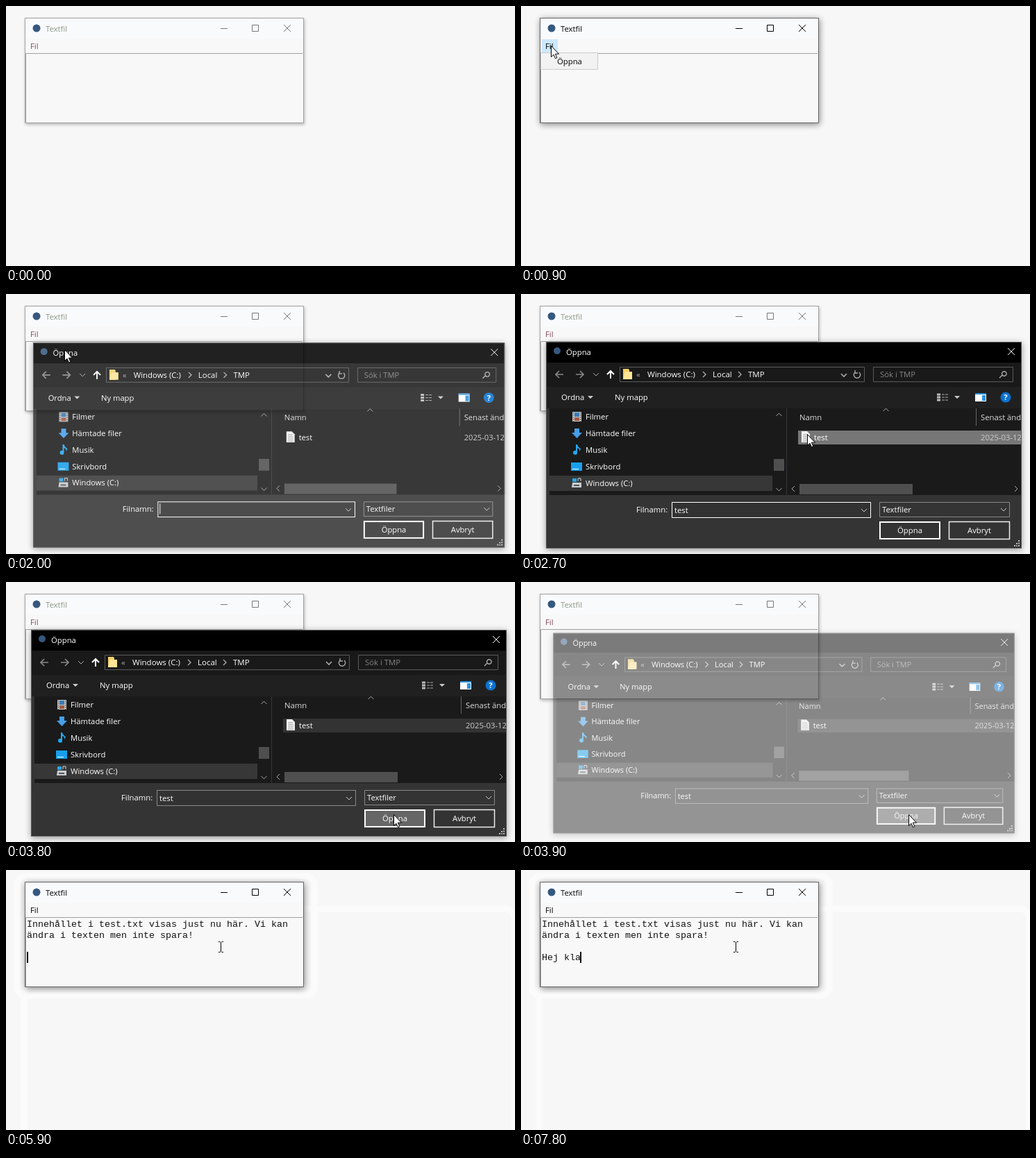
Write an HTML page that moves like this. It is 733 px wide and 375 px high and loops after 8 s.

```html
<!DOCTYPE html>
<html lang="sv">
<head>
<meta charset="utf-8">
<title>Textfil</title>
<style>
  html, body { margin: 0; width: 100%; height: 100%; overflow: hidden; background: #f7f7f7; }
  svg { display: block; font: 11.3px "Open Sans", "Noto Sans", sans-serif; }
  text { white-space: pre; }
  .line { fill: none; stroke: currentColor; }
  #window { --ink: #777; --title: #8a9a84; --menu: #7c4a60; --edge: #a2a2a2; color: var(--ink);
            filter: drop-shadow(1px 2px 2px #0004); }
  #window.active { --ink: #000; --title: #000; --menu: #000; --edge: #666; filter: drop-shadow(1px 2px 5px #0007); }
  #editor { font: 13.333px "Liberation Mono", monospace; fill: #111; }
  #dialog { fill: #fff; color: #aaa; transform-origin: 378.5px 218px; filter: drop-shadow(0 2px 5px #0006); }
  .path { font-size: 11.5px; font-weight: 500; }
  .dim { fill: #858585; }
  .halo { fill: none; stroke: #fbfbfb; stroke-width: 9; }
</style>
</head>
<body>
<svg width="733" height="375" viewBox="0 0 733 375">
  <defs>
    <clipPath id="frame"><rect x="36" y="69" width="685" height="298"/></clipPath>
    <path id="down" class="line" d="M-4 -2 0 2 4 -2"/>
    <path id="drop" d="M-4 -2H4L0 2Z"/>
  </defs>

  <g id="halos">
    <rect class="halo" x="26" y="56" width="706" height="330" rx="14"/>
    <rect class="halo" x="16" y="9" width="428" height="172" rx="12"/>
  </g>

  <g id="window">
    <rect x="27.5" y="17.5" width="401" height="151" fill="#f8f8f8" stroke="var(--edge)"/>
    <path d="M28 18H428V47H28Z" fill="#f9fafc"/>
    <circle cx="44" cy="32" r="5.5" fill="#35587f"/>
    <text x="57" y="37" fill="var(--title)">Textfil</text>
    <path class="line" d="M309 32.5h10M354.5 27.5h9v9h-9ZM400 27l10 10M410 27l-10 10"/>
    <rect id="menuHot" x="30" y="48" width="23" height="19" fill="#cce8ff"/>
    <text x="35" y="62" fill="var(--menu)">Fil</text>
    <path d="M28.5 168V68.5H427" fill="none" stroke="#a0a0a0"/>
  </g>

  <g id="editor">
    <g id="content">
      <text x="30" y="82">Innehållet i test.txt visas just nu här. Vi kan</text>
      <text x="30" y="98">ändra i texten men inte spara!</text>
    </g>
    <text id="typed" x="30" y="130"></text>
    <rect id="caret" y="118" width="2" height="16"/>
  </g>

  <rect id="popup" x="28.5" y="67.5" width="82" height="24" fill="#f2f2f2" stroke="#ccc"/>
  <g id="item">
    <rect id="itemHot" x="31" y="70" width="77" height="19" fill="#90c8f6"/>
    <text id="itemText" x="52" y="84">Öppna</text>
  </g>

  <g id="dialog">
    <g clip-path="url(#frame)">
      <path d="M36 69H722V368H36Z" fill="#343434"/>
      <path d="M36 69H722V99H36Z" fill="#000"/>
      <path d="M36 99H722V134H36Z" fill="#191919"/>
      <path d="M36 134H722V165H36Z" fill="#202020"/>
      <path d="M41 165H722V290H41Z" fill="#1a1a1a"/>
      <path d="M382.5 165V290" stroke="#34343c"/>

      <circle cx="52" cy="82" r="5" fill="#35587f"/>
      <text x="65" y="88">Öppna</text>
      <path class="line" d="M701 78l10 10M711 78l-10 10" color="#fff"/>

      <g class="line" stroke-width="1.7">
        <path d="M61 116H50M55 111l-5 5 5 5" color="#888"/>
        <path d="M79 116H90M85 111l5 5-5 5" color="#888"/>
        <path d="M129 122V111M124 116l5-5 5 5" stroke="#fff" stroke-width="2"/>
      </g>
      <use href="#down" x="108" y="116"/>
      <path class="line" d="M142.5 105.5h352v21h-352ZM507.5 105.5h201v21h-201Z" color="#5a5a5a"/>
      <path d="M147 108h8l1 2v13h-9Z" fill="#f5d16b"/><path d="M150 112h10v11H147Z" fill="#ffe596"/>
      <g class="path">
        <text x="166" y="120" fill="#aaa">«</text>
        <text x="182" y="120">Windows (C:)</text>
        <text x="276" y="120">Local</text>
        <text x="327" y="120">TMP</text>
      </g>
      <path class="line" d="M262 112l4 4-4 4M313 112l4 4-4 4" stroke-width="1.4"/>
      <use href="#down" x="465" y="117" stroke-width="1.6"/>
      <path class="line" d="M481 113a4.7 4.7 0 1 0 6 0M481 110v4h4" stroke-width="1.4"/>
      <text class="dim" x="517" y="120">Sök i TMP</text>
      <path class="line" d="M689 121l4-4M692.5 115a3.3 3.3 0 1 1 6.6 0a3.3 3.3 0 1 1-6.6 0" stroke-width="1.4"/>

      <text x="58" y="153">Ordna</text><use href="#drop" x="100" y="149" fill="#ccc"/>
      <text x="135" y="153">Ny mapp</text>
      <path class="line" d="M599 145h5M599 149h5M599 153h5" stroke-width="3" color="#bbb"/>
      <path class="line" d="M606 145h9M606 149h9M606 153h9" stroke-dasharray="4 1"/>
      <use href="#drop" x="628" y="149" fill="#ccc"/>
      <path d="M654 143h16v12h-16Z"/><path d="M654 143h16v2h-16ZM664 146h5v8h-5Z" fill="#2b93e0"/>
      <circle cx="698" cy="149" r="7.5" fill="#0a72d0"/>
      <text x="698" y="153" text-anchor="middle" font-weight="700">?</text>

      <path d="M41 262H362V284H41Z" fill="#373737"/>
      <path d="M74 170h13v14H74Z" fill="#c8c8c8"/><path d="M77 171h7v6h-7Z" fill="#397bb8"/><path d="M77 178h7v5h-7Z" fill="#a35b45"/>
      <path class="line" d="M75.5 171v13M85.5 171v13" stroke-dasharray="1.5 1.5" color="#333"/>
      <path d="M77 194h7v6h4l-7.500 8-7.500-8h4Z" fill="#479ee8"/>
      <path d="M79 217h2q1 4 5 6-1 3-2 4 1-4-3-5v7a3 3 0 1 1-2-3Z" fill="#25a8ef"/>
      <path d="M72 243h16v12H72Z" fill="#18a0ee"/><path d="M74 252h9v1h-9Z"/>
      <path d="M74 272h13v7H73Z" fill="#c9ced1"/><path d="M74 266h6v5h-6Z" fill="#2ba5e5"/><path d="M82 270v-4h4v4" class="line" color="#ddd"/><path d="M76 275h8v2h-8Z" fill="#555"/>
      <text x="93" y="181">Filmer</text>
      <text x="93" y="205">Hämtade filer</text>
      <text x="93" y="229">Musik</text>
      <text x="93" y="253">Skrivbord</text>
      <text x="93" y="277">Windows (C:)</text>

      <path d="M364 238h15v17h-15Z" fill="#4f4f4f"/>
      <path d="M401 274H564v15H401Z" fill="#4f4f4f"/>
      <path class="line" d="M367.500 176l4-4 4 4M394 277l-4 4 4 4M711 277l4 4-4 4M521.500 169l4-4 4 4"/>
      <use href="#down" x="371.5" y="282"/>

      <path d="M655.500 165V190" stroke="#666"/>
      <text x="401" y="182" fill="#ddd">Namn</text>
      <text x="662" y="182" fill="#ddd">Senast ändrat</text>
      <rect id="row" x="399" y="197" width="330" height="20"/>
      <path d="M404 198h8l4 4v12h-12Z" fill="#f2f2f2"/>
      <path class="line" d="M406 203h7M406 206h8M406 209h8M406 212h8" color="#999"/>
      <text x="422" y="211">test</text>
      <text x="662" y="211" fill="#ccc">2025-03-12</text>

      <text x="166" y="315">Filnamn:</text>
      <rect id="field" x="217.5" y="300.5" width="286" height="22" fill="#323232"/>
      <text id="fileName" x="221" y="316">test</text>
      <path id="fieldCaret" d="M220.500 303v15" stroke="#fff"/>
      <use href="#down" x="494" y="312" color="#ccc"/>
      <path class="line" d="M516.500 300.500h187v21h-187Z" color="#888"/>
      <text x="520" y="315">Textfiler</text>
      <use href="#down" x="695" y="311" color="#ccc"/>
      <rect id="open" x="517" y="329" width="86" height="24" stroke="#fff" stroke-width="2"/>
      <rect x="616.500" y="328.500" width="87" height="25" fill="#333" stroke="#eee" stroke-width="1.5"/>
      <g text-anchor="middle">
        <text x="560" y="345">Öppna</text>
        <text x="660" y="345">Avbryt</text>
      </g>
      <path d="M717 355v9M714 359v5M711 362v2" stroke="#bbb" stroke-width="2" stroke-dasharray="2 1.500"/>
      <rect x="36.500" y="69.500" width="684" height="297" fill="none" stroke="#555"/>
    </g>
  </g>

  <path id="arrow" d="M.5 .5V16.500L4 13.200 6.500 18.700 8.800 17.700 6.400 12.200H11.500Z" fill="#fff" stroke="#000"/>
  <path id="beam" class="line" d="M-3 -7.500H-.5M1.500 -7.500H4M-3 7.500H-.5M1.500 7.500H4M.5 -7V7"/>
</svg>
<script>
const LOOP = 8000, STEP = 100;
const $ = id => document.getElementById(id);
const show = (id, on) => $(id).style.display = on ? '' : 'none';
const within = (t, from, to) => t >= from && t < to;

// time, x, y of the pointer
const route = [
  [100, 628, 158], [800, 43, 56], [1000, 43, 58], [1300, 52, 75], [1500, 54, 76], [1800, 54, 76],
  [2000, 84, 80], [2500, 412, 202], [2900, 412, 202], [3400, 558, 335], [3900, 558, 335],
  [4400, 197, 138], [4600, 197, 138], [4700, 210, 143], [4800, 249, 130], [4900, 271, 118],
  [5100, 271, 108], [5300, 290, 103], [5700, 309, 111]
];
// time at which each character is typed
const phrase = 'Hej kla', keyTimes = [6500, 6700, 6800, 7000, 7500, 7700, 7800];

function pointerAt(t) {
  const next = route.findIndex(p => p[0] > t);
  if (next < 0) return route.at(-1).slice(1);
  const [t0, x0, y0] = route[Math.max(0, next - 1)], [t1, x1, y1] = route[next];
  const u = Math.max(0, (t - t0) / (t1 - t0));
  const k = t1 - t0 > 400 ? u * u * (3 - 2 * u) : u;
  return [x0 + (x1 - x0) * k, y0 + (y1 - y0) * k];
}

function drawPointer(t, busy) {
  const [x, y] = pointerAt(t).map(Math.round);
  const overText = !busy && within(x, 29, 427) && within(y, 69, 168);
  show('arrow', t >= 100 && !overText);
  show('beam', t >= 100 && overText);
  for (const id of ['arrow', 'beam']) $(id).setAttribute('transform', `translate(${x} ${y})`);
}

function drawMenu(t) {
  const open = within(t, 900, 1700), hot = t >= 1200;
  show('popup', open);
  show('menuHot', open);
  show('item', within(t, 900, 1900));
  show('itemHot', hot);
  $('item').style.opacity = t < 1700 ? 1 : t < 1800 ? .75 : .48;
  $('itemText').setAttribute('fill', open ? '#000' : '#fff');
}

function drawDialog(t) {
  const opening = Math.min(1, (t - 1800) / 300), closing = Math.max(0, (t - 3800) / 200);
  const shown = Math.max(0, 1 - (1 - opening) ** 1.8 - closing);
  show('dialog', within(t, 1900, 4000));
  $('dialog').style.opacity = shown;
  $('dialog').style.transform = `scale(${1 - .06 * (1 - shown)})`;
  const picked = t >= 2600;
  $('row').setAttribute('fill', t < 2400 ? 'none' : !picked || t >= 3700 ? '#333' : t < 3100 ? '#777' : '#626262');
  $('field').setAttribute('stroke', t < 3700 ? '#fff' : '#888');
  $('open').setAttribute('fill', t < 3400 ? '#333' : t < 3500 ? '#4d4d4d' : '#666');
  show('fileName', picked);
  show('fieldCaret', !picked);
}

function drawEditor(t) {
  const count = keyTimes.filter(k => k <= t).length;
  show('content', t >= 4000);
  $('typed').textContent = phrase.slice(0, count);
  $('caret').setAttribute('x', count ? 29 + 8 * count : 30);
  show('caret', t >= 5000 && (t - 5000) % 900 < 600);
}

function draw(now) {
  const t = Math.floor(now % LOOP / STEP) * STEP;
  $('window').classList.toggle('active', within(t, 800, 1700) || t >= 4000);
  show('halos', t >= 4100);
  drawMenu(t);
  drawDialog(t);
  drawEditor(t);
  drawPointer(t, within(t, 900, 4000));
}

let start;
function tick(now) {
  start ??= now;
  draw(now - start);
  requestAnimationFrame(tick);
}
draw(0);
requestAnimationFrame(tick);
</script>
</body>
</html>
```
